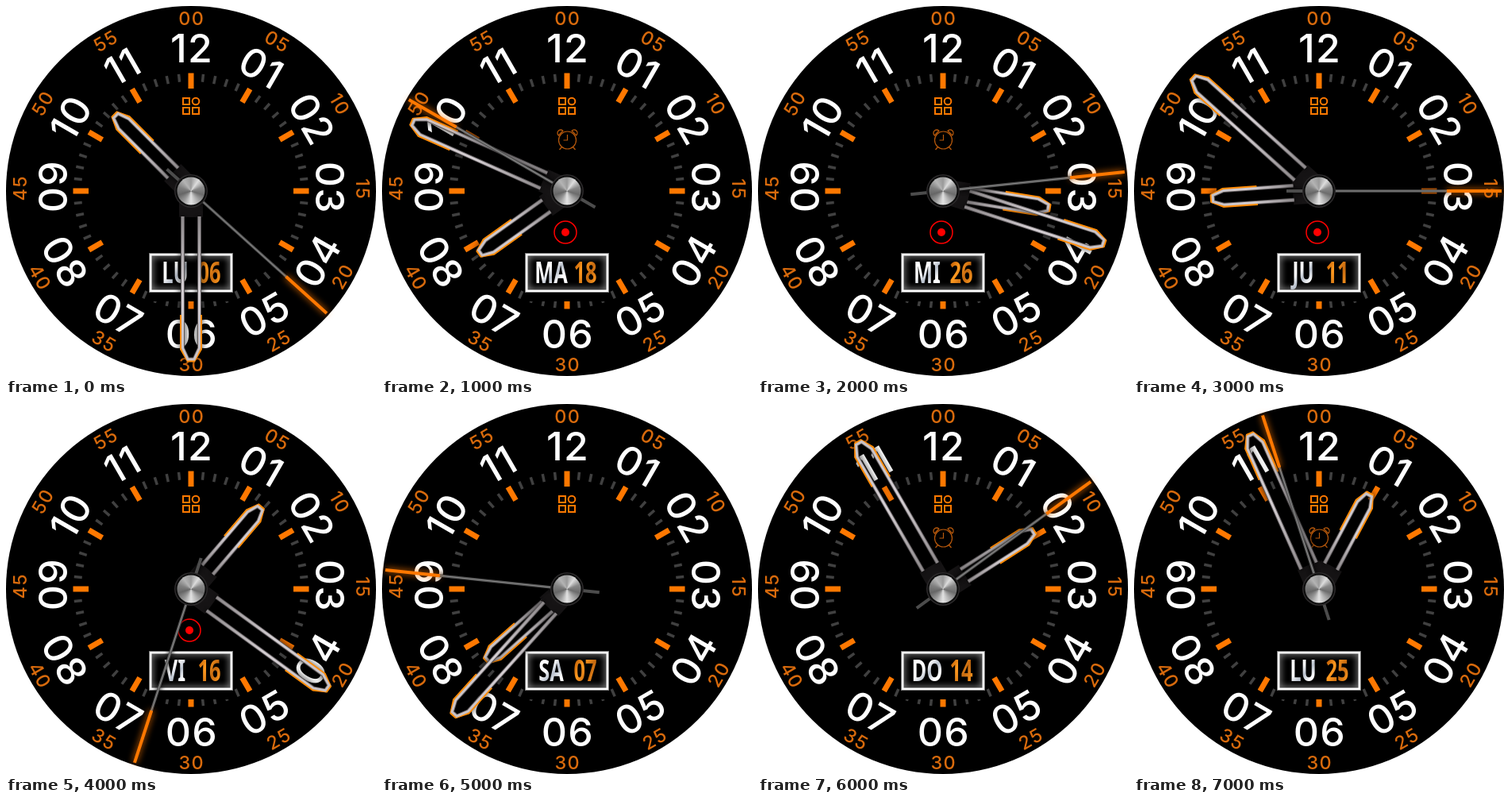
Write an HTML page with a canvas that moves like this. It is 466 by 466 pixels and loops after 8 s.

```html
<!DOCTYPE html>
<html lang="es">
<head>
<meta charset="utf-8">
<style>
  html, body { margin: 0; width: 100%; height: 100%; overflow: hidden; background: #fff; }
  canvas { display: block; }
</style>
</head>
<body>
<canvas width="466" height="466"></canvas>
<script>
const ctx = document.querySelector('canvas').getContext('2d');
const C = 233, ORANGE = '#ff7800', STEP = 1000;

// hour, minute, second, weekday, date, alarm, wireless
const states = [
  [10, 30, 22, 'LU', '06', 0, 0],
  [7, 49, 50, 'MA', '18', 1, 1],
  [3, 18, 14, 'MI', '26', 1, 1],
  [8, 52, 15, 'JU', '11', 0, 1],
  [1, 21, 33, 'VI', '16', 0, 1],
  [7, 37, 46, 'SA', '07', 0, 0],
  [1, 55, 9, 'DO', '14', 1, 0],
  [12, 56, 57, 'LU', '25', 1, 0],
];
const pad = n => String(n).padStart(2, '0');

// Number rings: horizontal radius above and below the middle, vertical radius, lift at the sides.
const hours = { upper: 175, lower: 184, ry: 180, lift: 5, spacing: 1,
  font: '500 50px Inter, sans-serif', color: '#fff' };
const minutes = { upper: 216, lower: 220, ry: 218, lift: 3, spacing: 1.5,
  font: '500 23.5px Inter, sans-serif', color: '#d86a0c' };

// Run paint() in coordinates moved to (x, y) and turned by deg.
function at(x, y, deg, paint) {
  ctx.save();
  ctx.translate(x, y);
  ctx.rotate(deg * Math.PI / 180);
  paint();
  ctx.restore();
}

function line(points, color, width) {
  ctx.beginPath();
  points.forEach(([x, y]) => ctx.lineTo(x, y));
  ctx.strokeStyle = color;
  ctx.lineWidth = width;
  ctx.stroke();
}

function ring(x, y, r, color, width) {
  ctx.beginPath();
  ctx.arc(x, y, r, 0, 7);
  ctx.strokeStyle = color;
  ctx.lineWidth = width;
  ctx.stroke();
}

function disc(x, y, r, fill) {
  ctx.beginPath();
  ctx.arc(x, y, r, 0, 7);
  ctx.fillStyle = fill;
  ctx.fill();
}

function gradient(x0, y0, x1, y1, ...colors) {
  const g = ctx.createLinearGradient(x0, y0, x1, y1);
  colors.forEach((c, i) => g.addColorStop(i / (colors.length - 1), c));
  return g;
}

// Text centred on its ink, kept upright in the lower half.
function label(text, deg, { upper, lower, ry, lift, spacing, font, color }) {
  const sin = Math.sin(deg * Math.PI / 180), cos = Math.cos(deg * Math.PI / 180);
  const below = deg > 90 && deg < 270;
  const x = C + (below ? lower : upper) * sin;
  const y = C - ry * cos - lift * sin ** 8;
  at(x, y, below ? deg + 180 : deg, () => {
    ctx.font = font;
    ctx.fillStyle = color;
    ctx.letterSpacing = spacing + 'px';
    const m = ctx.measureText(text);
    ctx.fillText(text, (m.actualBoundingBoxLeft - m.actualBoundingBoxRight) / 2,
      (m.actualBoundingBoxAscent - m.actualBoundingBoxDescent) / 2);
  });
}

function dial() {
  ctx.fillStyle = '#fff';
  ctx.fillRect(0, 0, 466, 466);
  disc(C, C, 233, '#000');
  for (let i = 0; i < 60; i++) {
    at(C, C, i * 6, () => {
      ctx.fillStyle = i % 5 ? '#404040' : ORANGE;
      if (i % 5) ctx.fillRect(-1.75, -148, 3.5, 10);
      else ctx.fillRect(-3.5, -148.5, 7, 19.5);
    });
  }
  for (let h = 0; h < 12; h++) {
    label(pad(h || 12), h * 30, hours);
    label(pad(h * 5), h * 30, minutes);
  }
}

function appsIcon() {
  ctx.strokeStyle = ORANGE;
  ctx.lineWidth = 2;
  for (const [x, y] of [[223, 116], [223, 128], [235, 128]]) ctx.strokeRect(x, y, 8, 8);
  ring(239, 120, 4.3, ORANGE, 2);
}

function alarmIcon() {
  const color = '#b8590c';
  at(233.5, 169, 0, () => {
    ring(0, 0, 11, color, 1.2);
    line([[0, -7], [0, 0], [-5, 0]], color, 1.2);
    for (const s of [-1, 1]) {
      line([[s * 7, 8.5], [s * 10, 12]], color, 1.3);
      ctx.beginPath();
      ctx.arc(s * 8.5, -9, 4, s < 0 ? 2.3 : 3.9, s < 0 ? 5.5 : 7.1);
      ctx.closePath();
      ctx.stroke();
    }
  });
}

function wirelessIcon() {
  ring(231, 285, 14, '#f00', 1.5);
  disc(231, 285, 5, '#f00');
}

function dateWindow(day, date) {
  ctx.fillStyle = '#000';
  ctx.fillRect(180, 311, 106, 61);
  ctx.save();
  ctx.beginPath();
  ctx.rect(180, 311, 106, 50);
  ctx.clip();
  ctx.shadowColor = '#fff';
  ctx.shadowBlur = 9;
  ctx.strokeStyle = '#fff';
  ctx.lineWidth = 3;
  ctx.strokeRect(182, 313, 102, 46);
  ctx.restore();
  ctx.strokeStyle = '#777';
  ctx.lineWidth = 1;
  ctx.strokeRect(180.5, 311.5, 105, 49);

  const condensed = (text, x, fill) => at(x, 349, 0, () => {
    ctx.scale(0.67, 1);
    ctx.font = '600 38px "Noto Sans", "Open Sans", sans-serif';
    ctx.letterSpacing = '0px';
    ctx.textAlign = 'center';
    ctx.fillStyle = fill;
    ctx.fillText(text, 0, 0);
  });
  condensed(day, 213, gradient(-10, -28, 10, 0, '#fff', '#fff', '#b8c0cc', '#fff'));
  condensed(date, 256, gradient(-20, -28, 20, 0, '#b85600', '#ff9a20', '#c66a10', '#ff9a20'));
}

// Two rails joined in a blunt tip with an orange edge.
function hand(deg, tip, half) {
  const shoulder = tip - 14;
  const outline = (grow, from) => {
    const w = half + grow, s = shoulder + grow / 2, t = tip + grow;
    return [[-w, -from], [-w, -s], [-4, -t], [4, -t], [w, -s], [w, -from]];
  };
  at(C, C, deg, () => {
    ctx.fillStyle = '#161415';
    ctx.fillRect(-15, -33, 30, 33);
    ctx.save();
    ctx.shadowColor = '#000';
    ctx.shadowBlur = 9;
    line(outline(0, 32), '#5a5658', 5);
    ctx.restore();
    line(outline(2.2, shoulder - 42), '#ff8c08', 2.6);
    line(outline(0, 32), gradient(0, -32, 0, -tip, '#8c888a', '#d4ced2', '#c9c2c6'), 3);
  });
}

function secondHand(deg) {
  at(C, C, deg, () => {
    ctx.shadowColor = '#000';
    ctx.shadowBlur = 6;
    line([[0, 41], [0, 0]], '#4c4c4c', 4);
    line([[0, 0], [0, -163]], '#5c5c5c', 3.5);
    line([[0, 0], [0, -163]], '#8a8a8a', 1);
    ctx.shadowColor = ORANGE;
    ctx.shadowBlur = 8;
    line([[0, -161], [0, -230]], ORANGE, 4);
  });
}

function hub() {
  disc(C, C, 21, '#2c2a2b');
  disc(C, C, 19.5, '#0c0c0c');
  const steel = ctx.createConicGradient(-Math.PI / 2, C, C);
  ['#999', '#ddd', '#888', '#6c6c6c', '#aaa', '#e4e4e4', '#999', '#666', '#808080', '#b4b4b4', '#999']
    .forEach((c, i) => steel.addColorStop(i / 10, c));
  disc(C, C, 17.5, steel);
}

function draw([hour, minute, second, day, date, alarm, wireless]) {
  dial();
  appsIcon();
  if (alarm) alarmIcon();
  if (wireless) wirelessIcon();
  dateWindow(day, date);
  hand((hour + minute / 60) * 30, 134, 9);
  hand(minute * 6, 212, 10.5);
  secondHand(second * 6);
  hub();
}

function frame() {
  draw(states[Math.floor(performance.now() / STEP) % states.length]);
  requestAnimationFrame(frame);
}
frame();
</script>
</body>
</html>
```
